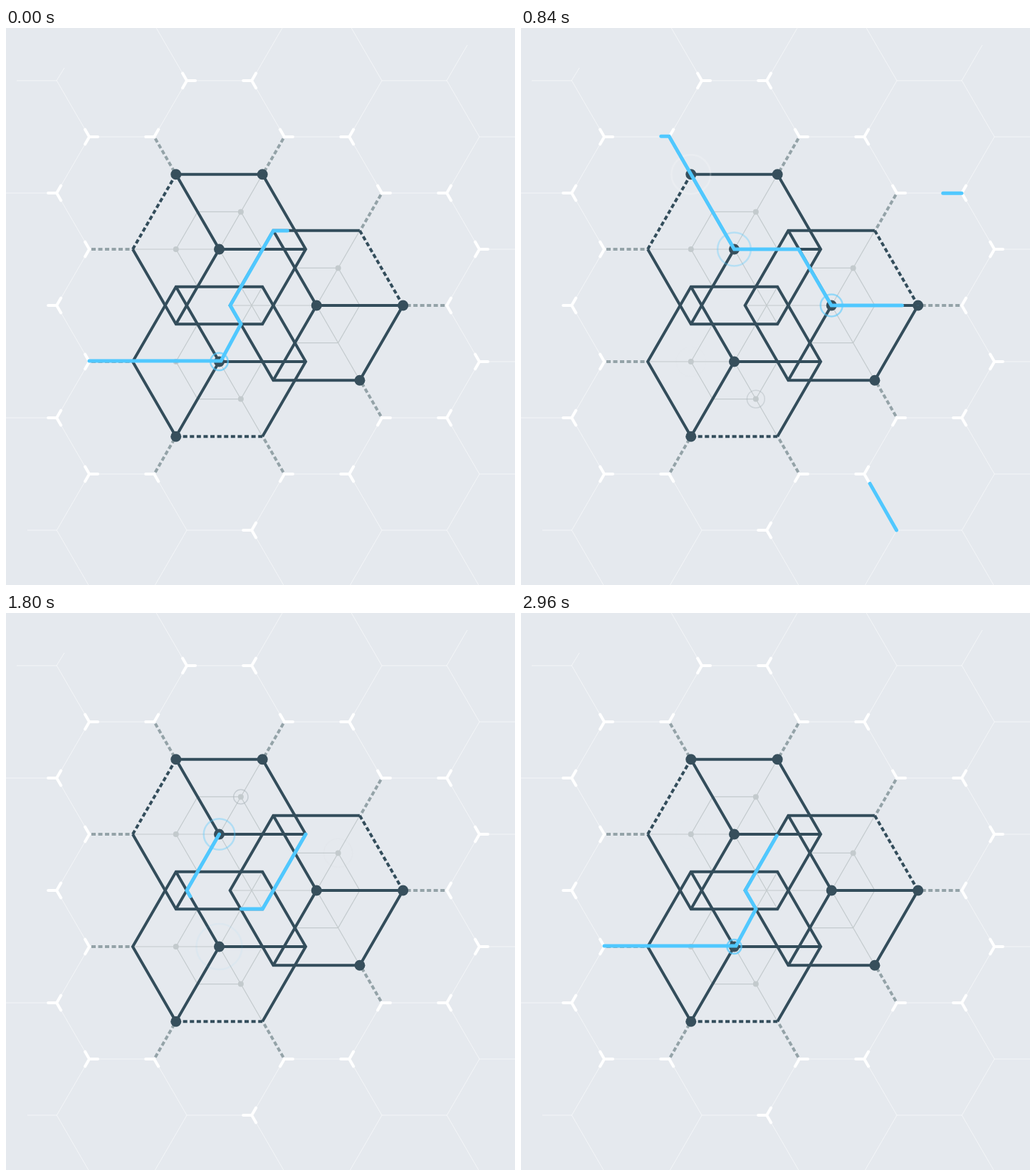
These frames come from a looping animation (715x783 px, 3000 ms). An HTML page:

```html
<!DOCTYPE html>
<html lang="en">
<head>
<meta charset="utf-8">
<title>Hexagon network</title>
<style>
  html, body { margin: 0; width: 100%; height: 100%; overflow: hidden; background: #e5e9ee; }
  svg { display: block; width: 715px; height: 783px; fill: none; }
  .lattice { stroke: #fff; stroke-opacity: .55; stroke-width: 1; }
  .arm { stroke: #fff; stroke-width: 4; stroke-linecap: round; }
  .link { stroke: #94a3a8; stroke-width: 4; stroke-dasharray: 6 3.5; }
  .thin { stroke: #c3cacd; stroke-width: 1.2; }
  .solid { stroke: #334d5b; stroke-width: 4; }
  .dashed { stroke: #334d5b; stroke-width: 4; stroke-dasharray: 6 3.6; }
  .small { fill: #c3cacd; }
  .node { fill: #374f5c; }
  .trail { stroke: #50c8ff; stroke-width: 5; stroke-linecap: round; }
</style>
</head>
<body>
<svg id="stage" viewBox="0 0 715 783"></svg>
<script>
const LOOP = 3000, TRAVEL = 1000, TAIL_DELAY = 560, RING_TIME = 1000;
const ROW = 79, EDGE = 91.4, COL = 137, R = 121.5, SIN60 = Math.sqrt(3) / 2;
const MIDDLE = [367.5, 390];
const svg = document.getElementById('stage');

function add(tag, attrs) {
  const el = document.createElementNS('http://www.w3.org/2000/svg', tag);
  for (const key in attrs) el.setAttribute(key, attrs[key]);
  svg.append(el);
  return el;
}
const path = (className, d) => add('path', { class: className, d });
const circle = (className, [cx, cy], r) => add('circle', { class: className, cx, cy, r });
const clamp = v => Math.min(1, Math.max(0, v));

// Background lattice with white joints and dashed links to the centre
function drawLattice() {
  let lines = 'M71 74H15M71 74L82 56M619 74L648 24M71 706H30', arms = '', links = '';
  const fromMiddle = (x, y) => Math.hypot(x - MIDDLE[0], y - MIDDLE[1]);
  const trimmed = (x, y, nx, ny) =>
    (x < 0 && [74, 390, 706].includes(ny)) ||
    (y < 0 && [71, 619].includes(Math.floor(nx)));

  for (let c = -1; c < 7; c++) {
    for (let r = -2; r < 12; r++) {
      if ((c + r) % 2) continue;
      for (const side of [1, -1]) {
        const x = 25.6 + c * COL + side * EDGE, y = 153 + r * ROW;
        const distance = fromMiddle(x, y);
        if (distance < 215) continue;
        const joint = distance < 350 && !(y === 706 && x < 300);
        for (const [dx, dy] of [[side, 0], [-side / 2, -1], [-side / 2, 1]]) {
          const nx = x + dx * EDGE, ny = y + dy * ROW;
          const point = k => `${x + dx * k} ${y + dy * SIN60 * k}`;
          if (fromMiddle(nx, ny) < 215) {
            links += `M${point(3)}L${point(60)}`;
            continue;
          }
          if (side > 0 && !trimmed(x, y, nx, ny)) lines += `M${x} ${y}L${nx} ${ny}`;
          if (joint) arms += `M${x} ${y}L${point(12)}`;
        }
      }
    }
  }
  path('lattice', lines);
  path('arm', arms);
  path('link', links);
}

// The three overlapping hexagons; gap is the index of the dashed edge
const hexes = [
  { center: [299.5, 311], gap: 3 },
  { center: [299.5, 469], gap: 1 },
  { center: [436.2, 390], gap: 5 }
];
const corner = ([x, y], k, r = R) => {
  const angle = k * Math.PI / 3;
  return [x + r * Math.cos(angle), y + r * Math.sin(angle)];
};
const polyline = points => 'M' + points.map(p => p.join(' ')).join('L');

function drawHexes() {
  const range = [0, 1, 2, 3, 4, 5];
  for (const { center } of hexes) {
    const inner = polyline(range.map(k => corner(center, k, R / 2))) + 'Z';
    const spokes = [1, 3, 5].map(k => polyline([center, corner(center, k)])).join('');
    path('thin', inner + spokes);
  }
  for (const { center, gap } of hexes) {
    const rim = polyline(range.map(k => corner(center, gap + 1 + k)));
    const spokes = [0, 2, 4].map(k => polyline([center, corner(center, k)])).join('');
    path('solid', rim + spokes);
    path('dashed', polyline([corner(center, gap), corner(center, gap + 1)]));
  }
}

const [upper, lower, east] = hexes.map(h => h.center);
const topLeft = corner(upper, 4), topRight = corner(upper, 5);
const bottomLeft = corner(lower, 2), farEast = corner(east, 0);
const half = (center, k) => corner(center, k, R / 2);

drawLattice();
drawHexes();

const pulses = [
  [half(lower, 3), 2960], [half(lower, 1), 480], [half(east, 5), 1000],
  [half(upper, 5), 1520], [half(upper, 3), 2040]
];
pulses.forEach(([at]) => circle('small', at, 4));
[topLeft, topRight, upper, lower, bottomLeft, east, farEast, corner(east, 1)]
  .forEach(at => circle('node', at, 7.5));

function makeRing(at, start, color, size, width) {
  const el = circle('ring', at, 0);
  el.setAttribute('stroke', color);
  el.setAttribute('stroke-width', width);
  return { el, start, size };
}
const rings = [
  ...pulses.map(([at, start]) => makeRing(at, start, '#a9b2b8', 21, 1.5)),
  makeRing(topLeft, 280, '#fff', 34, 2.5),
  ...[
    [lower, 2800], [upper, 400], [east, 580], [farEast, 840],
    [lower, 1040], [upper, 1400], [lower, 1840], [bottomLeft, 1920]
  ].map(([at, start]) => makeRing(at, start, '#50c8ff', 34, 2.5))
];

const trails = [
  ['M117 468H302L330 416L315 390L375.5 285H497.5L527 232.3H619', 2440],
  ['M117 152.3H208L299.5 311H390L436 390H558', 0],
  ['M527.5 706L482.5 627H390L254 390L299.5 311', 560],
  ['M421 311L360.5 416H330L208.5 627.7H117', 1400]
].map(([d, start]) => {
  const el = path('trail', d);
  return { el, start, length: el.getTotalLength() };
});

// Same curve as cubic-bezier(.5, 0, .5, 1)
function ease(x) {
  if (x <= 0 || x >= 1) return clamp(x);
  let low = 0, high = 1;
  for (let i = 0; i < 24; i++) {
    const s = (low + high) / 2;
    if (1.5 * s * (1 - s) + s ** 3 < x) low = s; else high = s;
  }
  return low * low * (3 - 2 * low);
}

function render(time) {
  const age = start => (time - start + LOOP) % LOOP;

  for (const { el, start, length } of trails) {
    const t = age(start);
    const head = ease(t / TRAVEL) * length;
    const tail = ease((t - TAIL_DELAY) / TRAVEL) * length;
    const visible = head - tail > .05;
    el.style.display = visible ? '' : 'none';
    if (visible) {
      el.setAttribute('stroke-dasharray', `${head - tail} ${length * 2}`);
      el.setAttribute('stroke-dashoffset', -tail);
    }
  }
  for (const { el, start, size } of rings) {
    const left = 1 - clamp(age(start) / RING_TIME);
    el.setAttribute('r', size * (1 - left * left));
    el.setAttribute('stroke-opacity', left * left);
  }
}

const begin = performance.now();
function tick() {
  render((performance.now() - begin) % LOOP);
  requestAnimationFrame(tick);
}
tick();
</script>
</body>
</html>
```
